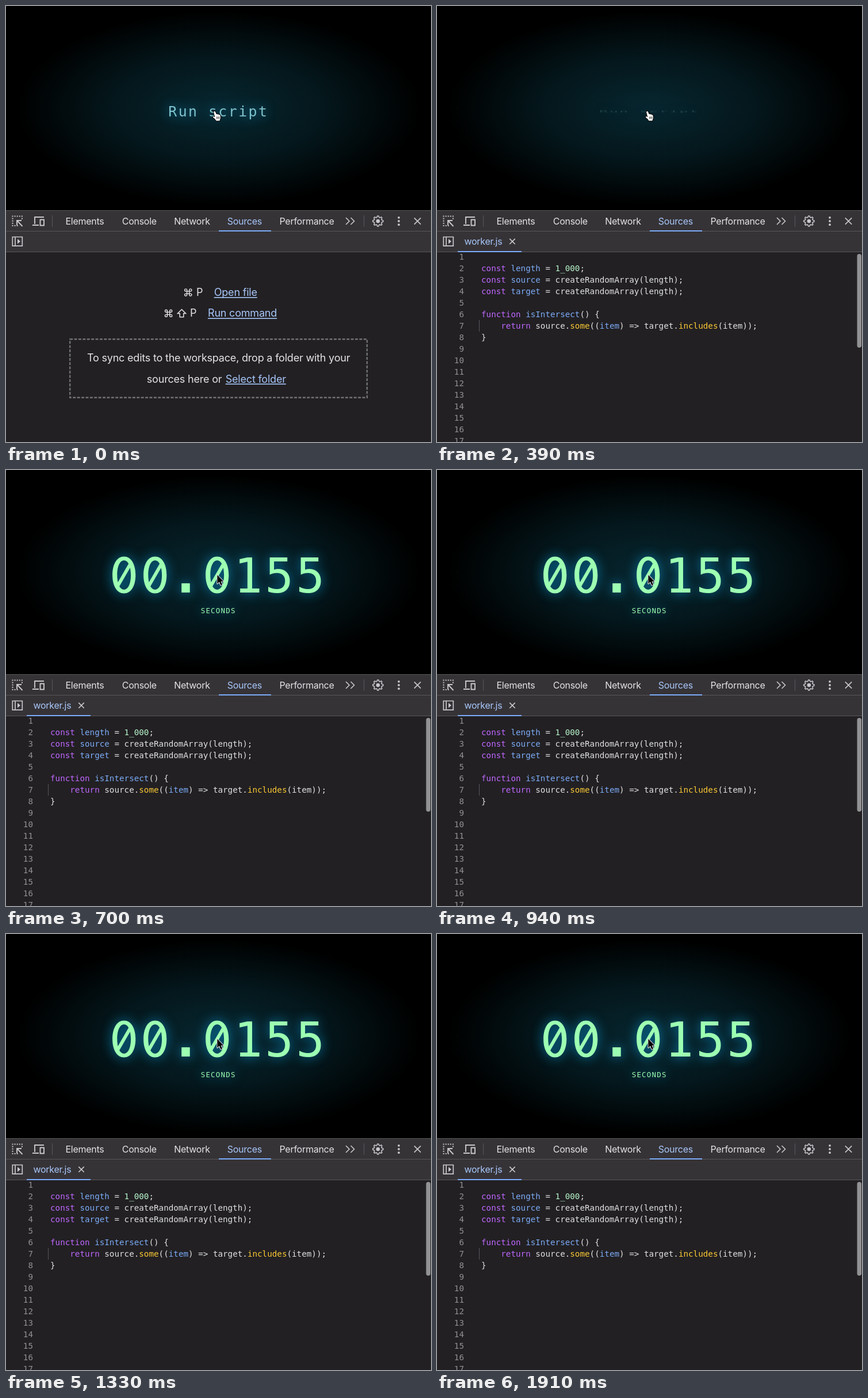
Recreate the animation shown at these times as an HTML page with a canvas. Size 739 px wide and 758 px high, loop 1.94 s.

```html
<!DOCTYPE html>
<html lang="en">
<head>
<meta charset="utf-8">
<title>Run script timer</title>
<style>
html, body { margin: 0; width: 100%; height: 100%; overflow: hidden; background: #000; }
canvas { display: block; }
</style>
</head>
<body>
<canvas id="stage" width="739" height="758"></canvas>
<script>
const W = 739, H = 758, LOOP = 1940;
const SANS = 'Inter, "Liberation Sans", sans-serif';
const MONO = '"DejaVu Sans Mono", "Liberation Mono", monospace';
const TEXT = '#e4e3e6', BLUE = '#a8c7fa', ICON = '#c8c7ca', ACCENT = '#7cacf8', RULE = '#59575b';

const ctx = document.getElementById('stage').getContext('2d');
const layer = document.createElement('canvas');
layer.width = W;
layer.height = 355;
const ink = layer.getContext('2d');

const clamp = v => Math.min(1, Math.max(0, v));
const span = (t, from, to) => clamp((t - from) / (to - from));
const easeOut = p => 1 - (1 - p) ** 3;
const mix = (a, b, p) => `rgb(${a.map((v, i) => Math.round(v + (b[i] - v) * p))})`;

function rect(x, y, w, h, color) {
  ctx.fillStyle = color;
  ctx.fillRect(x, y, w, h);
}

function text(c, str, x, y, size, family, color, align = 'left', spacing = 0) {
  c.font = `${size}px ${family}`;
  c.letterSpacing = spacing + 'px';
  c.textAlign = align;
  c.fillStyle = color;
  c.fillText(str, x, y);
}

const label = (str, x, y, color = TEXT, align = 'left') =>
  text(ctx, str, x, y, 18, SANS, color, align, -0.2);
const tab = (str, x, y, color = TEXT) =>
  text(ctx, str, x, y, 16, SANS, color, 'center', -0.26);

function link(str, x, y) {
  label(str, x, y, BLUE);
  rect(x, y + 2, ctx.measureText(str).width, 1.6, BLUE);
}

function stroke(d, width = 1.7, color = ICON) {
  ctx.strokeStyle = color;
  ctx.lineWidth = width;
  ctx.stroke(new Path2D(d));
}

function disc(x, y, r, color = ICON) {
  ctx.fillStyle = color;
  ctx.beginPath();
  ctx.arc(x, y, r, 0, 7);
  ctx.fill();
}

const cross = (x, y, r) =>
  stroke(`M${x - r} ${y - r}l${2 * r} ${2 * r}m0 ${-2 * r}l${-2 * r} ${2 * r}`);

// Glowing screen

function backdrop() {
  rect(0, 0, W, 356, '#000');
  ctx.save();
  ctx.beginPath();
  ctx.rect(0, 0, W, 355);
  ctx.clip();
  ctx.translate(W / 2, 177.5);
  ctx.scale(W / 355, 1);
  const g = ctx.createRadialGradient(0, 0, 0, 0, 0, 251);
  g.addColorStop(0, '#07262f');
  g.addColorStop(0.35, '#04171c');
  g.addColorStop(0.67, '#000');
  ctx.fillStyle = g;
  ctx.fillRect(-178, -178, 356, 356);
  ctx.restore();
}

function oval(path, x, y, rx, ry, dir) {
  const k = 0.6, a = rx * dir;
  path.moveTo(x, y - ry);
  path.bezierCurveTo(x + a * k, y - ry, x + a, y - ry * k, x + a, y);
  path.bezierCurveTo(x + a, y + ry * k, x + a * k, y + ry, x, y + ry);
  path.bezierCurveTo(x - a * k, y + ry, x - a, y + ry * k, x - a, y);
  path.bezierCurveTo(x - a, y - ry * k, x - a * k, y - ry, x, y - ry);
  path.closePath();
}

function slashedZero(x) {
  const p = new Path2D(), y = 182.6;
  oval(p, x, y, 20.1, 32, 1);
  oval(p, x, y, 11.9, 25.4, -1);
  p.moveTo(x - 12, y + 15);
  p.lineTo(x + 8.5, y - 20.5);
  p.lineTo(x + 12, y - 15);
  p.lineTo(x - 8.5, y + 20.5);
  p.closePath();
  ink.fill(p);
}

// Paints text on its own layer, then lays it down with one shared glow.
function glow(squash, alpha, paint) {
  if (alpha <= 0) return;
  ink.clearRect(0, 0, W, 355);
  ink.save();
  ink.translate(0, 183);
  ink.scale(1, squash);
  ink.translate(0, -183);
  paint();
  ink.restore();
  ctx.save();
  ctx.globalAlpha = alpha;
  ctx.shadowColor = 'rgba(10,165,230,0.75)';
  ctx.shadowBlur = 20.7;
  ctx.drawImage(layer, 0, 0);
  ctx.restore();
}

function button(out) {
  glow(1 - out, 1 - out, () =>
    text(ink, 'Run script', 282.2, 192, 24.84, MONO, '#7cc3cd', 'left', 2.48));
}

function counter(p) {
  const color = mix([200, 215, 214], [157, 255, 178], p);
  glow(easeOut(p), Math.sin(p * Math.PI / 2), () => {
    [...'00.0155'].forEach((ch, i) => {
      const x = 205.2 + 54 * i;
      ink.fillStyle = color;
      if (ch === '0') slashedZero(x);
      else if (ch === '.') ink.fillRect(x - 8, 197, 14.5, 16);
      else text(ink, ch, x, 213, 82.8, MONO, color, 'center');
    });
    text(ink, 'SECONDS', 338.7, 249, 12.42, MONO, color, 'left', 1.24);
  });
}

// Tool bars

function inspectIcon() {
  for (let i = 0; i < 5; i++) {
    const d = 10.5 + i * 4.1, y = 364.5 + i * 4.1;
    rect(d, 364.5, 2, 2, ICON);
    if (i) rect(10.5, y, 2, 2, ICON);
    if (i === 1) rect(26.9, y, 2, 2, ICON);
    if (i === 1 || i === 2) rect(d, 380.9, 2, 2, ICON);
  }
  stroke('M19 381v-8h8M19.5 373.5l9 9.5', 1.9);
}

function gear(x, y) {
  ctx.beginPath();
  for (let i = 0; i < 32; i++) {
    const a = (i - 0.5) * Math.PI / 16, r = i % 4 < 2 ? 9 : 6.9;
    ctx.lineTo(x + r * Math.cos(a), y + r * Math.sin(a));
  }
  ctx.closePath();
  ctx.strokeStyle = ICON;
  ctx.lineWidth = 1.6;
  ctx.stroke();
  disc(x, y, 3.3);
}

function toolbars() {
  rect(0, 355, W, 73, '#363337');
  for (const y of [355, 391, 427]) rect(0, y, W, 1, RULE);
  inspectIcon();
  stroke('M66 367H50v12M46 381h11M59.5 371.5h6.5v10h-6.5z', 1.9);
  rect(80, 364, 1, 20, RULE);
  rect(622, 364, 1, 20, RULE);
  tab('Elements', 137, 380);
  tab('Console', 231.8, 380);
  tab('Network', 323.5, 380);
  tab('Sources', 414.8, 380, BLUE);
  tab('Performance', 523, 380);
  rect(370, 390, 91, 2, ACCENT);
  stroke('M591 368l6 6-6 6M599.5 368l6 6-6 6', 1.6);
  gear(646.8, 374);
  for (const y of [367.8, 374, 380.2]) disc(683, y, 1.9);
  cross(715.5, 374, 5.7);
  stroke('M11.3 401.5h17v15.6h-17zM16 401.5v15.6', 1.7);
  ctx.fillStyle = ICON;
  ctx.fill(new Path2D('M20 405l5 4.3-5 4.3z'));
}

// Panel before and after the file opens

function commandKey(x, y) {
  const a = 2.1, r = 2;
  ctx.strokeStyle = TEXT;
  ctx.lineWidth = 1.4;
  ctx.strokeRect(x - a, y - a, 2 * a, 2 * a);
  for (const sx of [-1, 1]) for (const sy of [-1, 1]) {
    const cx = x + sx * (a + r), cy = y + sy * (a + r);
    ctx.beginPath();
    ctx.moveTo(x + sx * a, y + sy * a);
    ctx.lineTo(x + sx * a, cy);
    ctx.arc(cx, cy, r, sx > 0 ? Math.PI : 0, -sy * Math.PI / 2, sx * sy > 0 ? true : false);
    ctx.lineTo(x + sx * a, y + sy * a);
    ctx.stroke();
  }
}

function emptyPanel() {
  commandKey(316.7, 498);
  label('P', 331, 504);
  link('Open file', 361.7, 504);
  commandKey(282.6, 534.3);
  stroke('M305.5 527.5l7 7h-3.7v6.3h-6.6v-6.3h-3.7z', 1.5, TEXT);
  label('P', 320, 540.4);
  link('Run command', 351, 540.4);
  ctx.strokeStyle = '#717074';
  ctx.lineWidth = 2.4;
  ctx.setLineDash([4.9, 2.5]);
  ctx.strokeRect(111.2, 579.2, 516.6, 101.6);
  ctx.setLineDash([]);
  label('To sync edits to the workspace, drop a folder with your', 369.6, 618, TEXT, 'center');
  label('sources here or', 244.8, 654.5);
  link('Select folder', 381.7, 654.5);
}

// One letter of style per chunk: k keyword, d definition, n number, p property, t plain
const STYLE = { k: '#bf67ff', d: '#7cacf8', n: '#b8f5cb', p: '#fcc934', t: '#e0e0e2' };
const CODE = [
  '',
  'k:const |d:length|t: = |n:1_000|t:;',
  'k:const |d:source|t: = createRandomArray(length);',
  'k:const |d:target|t: = createRandomArray(length);',
  '',
  'k:function |d:isIntersect|t:() {',
  'k:    return |t:source.|p:some|t:((|d:item|t:) => target.|p:includes|t:(item));',
  't:}'
];

function editor() {
  const size = 14.24, step = size * 0.602;
  tab('worker.js', 80.4, 415, BLUE);
  cross(131, 409.3, 4.7);
  rect(36, 426, 111, 2, ACCENT);
  for (let i = 0; i < 17; i++) {
    const y = 441.3 + i * 20;
    text(ctx, String(i + 1), 47, y, size, MONO, '#919094', 'right');
    let x = 77;
    for (const part of (CODE[i] || '').split('|')) {
      const str = part.slice(2);
      text(ctx, str, x, y, size, MONO, STYLE[part[0]] || TEXT);
      x += str.length * step;
    }
  }
  rect(73, 546, 1, 20, '#56555a');
  ctx.fillStyle = '#929194';
  ctx.beginPath();
  ctx.roundRect(730.5, 431, 7.5, 163, 3.7);
  ctx.fill();
}

// Pointer

const HAND = 'M.4 2.2Q.6 .2 2.4 .8Q3.4 1.4 5.2 6Q6.4 5 7.4 6.2Q8.8 5.4 9.8 6.8Q11.6 6.4 12 8.6L12.2 12.6L10.8 17.2H4.8L2.6 14L-.6 11.4Q-1.4 9.8 .6 9.8L2.8 11Z';
const KNUCKLES = 'M5.8 10v4M7.9 10v4M10 10v4';
const ARROW = 'M0 0V15.2L3.5 12L6 17.7L8.6 16.6L6.1 11.1H10.8z';

function pointer(d, x, y, fill, edge, detail = '') {
  ctx.save();
  ctx.translate(x, y);
  ctx.lineJoin = 'round';
  stroke(d, 2, edge);
  ctx.fillStyle = fill;
  ctx.fill(new Path2D(d));
  stroke(detail, 0.8, edge);
  ctx.restore();
}

function ring(t) {
  const p = easeOut(span(t, 130, 240)), fade = 1 - span(t, 250, 330);
  if (p <= 0 || fade <= 0) return;
  const r = 14 + 18.7 * p;
  ctx.save();
  ctx.globalAlpha = fade * Math.min(1, p * 2);
  ctx.lineWidth = 1;
  for (const [d, color] of [[0, '#b9aaa5'], [2.3, '#a89c98']]) {
    ctx.strokeStyle = color;
    ctx.beginPath();
    ctx.arc(366.4, 183, r - d, 0, 7);
    ctx.stroke();
  }
  ctx.restore();
}

function draw(t) {
  backdrop();
  if (t < 420) button(span(t, 310, 410));
  else counter(span(t, 420, 620));

  rect(0, 428, W, H - 428, '#222023');
  toolbars();
  if (t < 390) emptyPanel();
  else editor();

  ring(t);
  if (t < 420) pointer(HAND, 360.6 + 3 * easeOut(span(t, 0, 200)), 182.3, '#fff', '#000', KNUCKLES);
  else pointer(ARROW, 367.4, 182.6, '#000', '#e8e8e8');
}

const start = performance.now();
function tick() {
  draw((performance.now() - start) % LOOP);
  requestAnimationFrame(tick);
}
tick();
</script>
</body>
</html>
```
